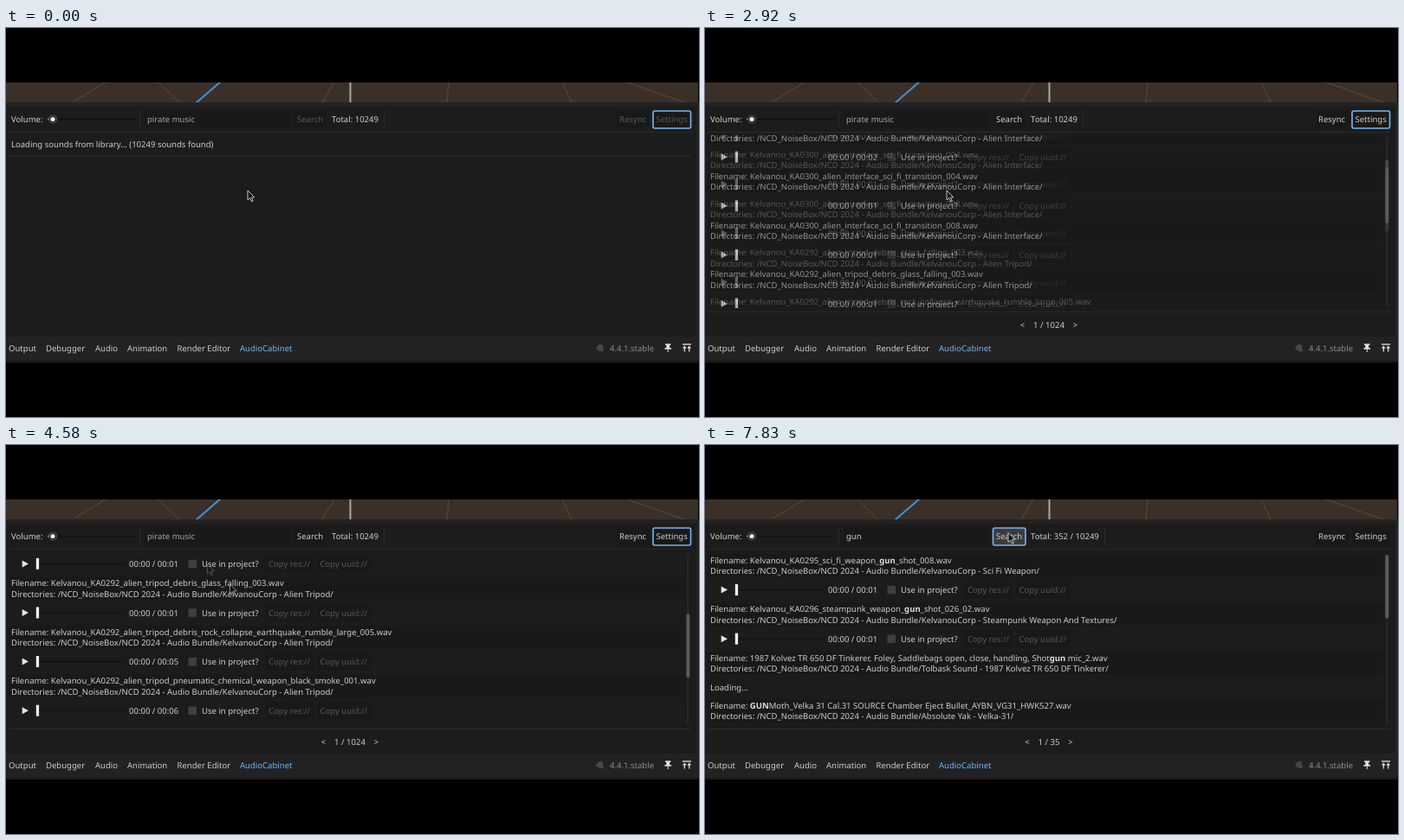
Write an HTML page with a canvas that moves like this. It is 800 px wide and 450 px high and loops after 8 s.

```html
<!DOCTYPE html>
<html lang="en">
<head>
<meta charset="utf-8">
<title>Sound browser</title>
<style>
html, body { margin: 0; width: 100%; height: 100%; overflow: hidden; background: #000; }
canvas { display: block; }
</style>
</head>
<body>
<canvas id="stage" width="800" height="450"></canvas>
<script>
const FACE = '9.54px "Noto Sans", "Open Sans", sans-serif';
const TEXT = '#cdcdcd', DIM = '#585758', BRIGHT = '#e4e4e4', BLUE = '#6fb4f0';
const BASE = '#232223', PANEL = '#1d1c1d', DARK = '#1a191a', LINE = '#2b2a2b';
const PITCH = 56.6, LIST_TOP = 124, LIST_END = 324;

const row = (name, dir, time) => ({ name: name + '.wav', dir, time });
const pack = (code, name, dir, time) =>
  row(`Kelvanou_KA${code}_${name}`, 'KelvanouCorp - ' + dir, time);
const face = (name, time) => pack('0300', 'alien_interface_sci_fi_' + name, 'Alien Interface', time);
const tripod = (name, time) => pack('0292', 'alien_tripod_' + name, 'Alien Tripod', time);

const library = [
  face('texture_003', 3), face('texture_045', 2),
  face('transition_004', 1), face('transition_008', 1),
  tripod('debris_glass_falling_003', 1),
  tripod('debris_rock_collapse_earthquake_rumble_large_005', 5),
  tripod('pneumatic_chemical_weapon_black_smoke_001', 6),
  tripod('texture_organic_liquid_005', 4)
];
const matches = [
  pack('0295', 'sci_fi_weapon_gun_shot_008', 'Sci Fi Weapon', 1),
  pack('0296', 'steampunk_weapon_gun_shot_026_02', 'Steampunk Weapon And Textures', 1),
  row('1987 Kolvez TR 650 DF Tinkerer, Foley, Saddlebags open, close, handling, Shotgun mic_2',
      'Tolbask Sound - 1987 Kolvez TR 650 DF Tinkerer'),
  row('GUNMoth_Velka 31 Cal.31 SOURCE Chamber Eject Bullet_AYBN_VG31_HWK527',
      'Absolute Yak - Velka-31')
];

// The recording has four poses a second; each entry changes the pose from that beat on.
const changes = {
  0: { rows: null, scroll: 0, mouse: [279, 188], focus: 'settings', query: 'pirate music',
       total: '10249', page: '1 / 1024' },
  2: { rows: library },
  10: { scroll: 100 }, 12: { scroll: 75 }, 13: { scroll: 125 }, 14: { scroll: 200 },
  17: { scroll: 225 },
  18: { scroll: 200, mouse: [258.5, 161] },
  19: { mouse: [232.5, 138] },
  20: { mouse: [199.5, 101], beam: true, focus: 'query', caret: 218 },
  22: { query: 'g', caret: 170 },
  26: { query: 'gun', caret: 181 },
  28: { mouse: [310, 103], beam: false },
  29: { mouse: [350, 101.5], focus: 'search', caret: 0 },
  30: { rows: matches, scroll: 0, mark: true, total: '352 / 10249', page: '1 / 35' }
};
const poses = [];
for (let i = 0; i <= 32; i++) poses.push({ ...poses[i - 1], ...changes[i] });

function makeContext(canvas) {
  const c = canvas.getContext('2d');
  c.font = FACE;
  c.textRendering = 'geometricPrecision';
  return c;
}
const screen = makeContext(document.getElementById('stage'));
const layer = document.createElement('canvas');
layer.width = 800;
layer.height = 450;
const g = makeContext(layer);

function box(x, y, w, h, color) {
  g.fillStyle = color;
  g.fillRect(x, y, w, h);
}
// y is the middle of the capitals
function text(s, x, y, color = TEXT) {
  g.fillStyle = color;
  g.fillText(s, x, y + 3.5);
  return x + g.measureText(s).width;
}
function poly(points, fill, stroke, width = 1) {
  g.beginPath();
  points.forEach(([x, y]) => g.lineTo(x, y));
  if (fill) { g.closePath(); g.fillStyle = fill; g.fill(); }
  if (stroke) { g.strokeStyle = stroke; g.lineWidth = width; g.stroke(); }
}
function disc(x, y, r, color) {
  g.beginPath();
  g.arc(x, y, r, 0, 7);
  g.fillStyle = color;
  g.fill();
}
function control(x, w, focused, fill = DARK) {
  g.beginPath();
  g.roundRect(x, 96, w, 20, 2);
  g.fillStyle = fill;
  g.fill();
  if (focused) {
    g.strokeStyle = '#70b8f6';
    g.lineWidth = 1.6;
    g.stroke();
  }
}

function viewport() {
  g.save();
  g.beginPath();
  g.rect(0, 63, 799, 23);
  g.clip();
  box(0, 63, 799, 23, '#3b3027');
  [[78, 85, 115, 63], [176, 63, 200, 86], [365, 86, 379, 63], [509, 86, 511, 63],
   [642, 63, 653, 86], [717, 63, 783, 86]]
    .forEach(([a, b, c, d]) => poly([[a, b], [c, d]], null, '#5d5247', 0.8));
  poly([[219, 87], [249, 61]], null, '#3f93dc', 2);
  poly([[397.5, 63], [397.5, 86]], null, '#a5aca2', 2);
  g.restore();
}

function toolbar(p) {
  const active = p.rows ? TEXT : DIM;
  text('Volume:', 6, 105.5);
  box(48, 104.7, 103, 1.6, '#121112');
  box(48, 104.7, 4, 1.6, '#8a8a8a');
  disc(54, 105.5, 4.8, '#6e6d6e');
  disc(54, 105.5, 3.9, DARK);
  disc(54, 105.5, 2.6, '#f2f2f2');
  box(154, 96, 1, 20, LINE);
  control(159.5, 169, p.focus === 'query');
  text(p.query, 163, 105.5, p.query.length > 3 ? '#a4a4a4' : TEXT);
  if (p.caret) box(p.caret - 0.8, 100, 0.9, 11, TEXT);
  const pressed = p.focus === 'search';
  control(332.5, 37.5, pressed, pressed ? '#3d3c3d' : DARK);
  text('Search', 336, 105.5, active);
  const end = text('Total: ' + p.total, 376, 105.5);
  box(Math.round(end + 6.5), 96, 1, 20, LINE);
  control(705, 38);
  text('Resync', 708, 105.5, active);
  control(747, 43.5, p.focus === 'settings');
  text('Settings', 750.5, 105.5, active);
  box(3, 120, 788, 1, LINE);
}

function title(name, y, mark) {
  let x = text('Filename: ', 6, y);
  for (const part of mark ? name.split(/(gun)/i) : [name]) {
    const bold = mark && /^gun$/i.test(part);
    g.font = (bold ? 'bold ' : '') + FACE;
    x = text(part, x, y, bold ? '#dedede' : TEXT);
  }
  g.font = FACE;
}

function entry(item, y, mark) {
  box(3, y - 7, 780, 26, DARK);
  title(item.name, y, mark);
  text(`Directories: /NCD_NoiseBox/NCD 2024 - Audio Bundle/${item.dir}/`, 6, y + 12.4);
  const mid = y + 34.4;
  if (!item.time) {
    text('Loading...', 6, mid - 0.8);
    return PITCH - 1.5;
  }
  poly([[18.7, mid - 4], [26, mid], [18.7, mid + 4]], BRIGHT);
  box(38, mid - 0.8, 99, 1.6, '#141314');
  box(34.8, mid - 6.5, 3.3, 13, '#f2f2f2');
  text('00:00 / 00:0' + item.time, 142, mid);
  box(210.5, mid - 4.7, 9.5, 9.5, '#403f40');
  text('Use in project?', 226, mid);
  box(299.5, mid - 10, 55, 20, DARK);
  text('Copy res://', 303, mid, DIM);
  box(359, mid - 10, 62, 20, DARK);
  text('Copy uuid://', 362.5, mid, DIM);
  return PITCH;
}

function list(p) {
  g.save();
  g.beginPath();
  g.rect(0, LIST_TOP, 796, LIST_END - LIST_TOP);
  g.clip();
  let y = 133.2 - p.scroll;
  for (const item of p.rows) y += entry(item, y, p.mark);
  g.restore();

  box(786.2, 127, 2, 195, LINE);
  g.beginPath();
  g.roundRect(785.3, 127 + p.scroll * 0.342, 4, 73.5, 2);
  g.fillStyle = '#5c5b5c';
  g.fill();

  box(3, 328, 788, 1, LINE);
  const half = g.measureText(p.page).width / 2;
  text(p.page, 397 - half, 343.5);
  text('<', 394 - half - 12.3, 343.5);
  text('>', 394.5 + half + 12.3, 343.5);
}

function tabs() {
  box(0, 357, 800, 30, BASE);
  box(0, 384.5, 800, 2.5, '#1b1a1b');
  [['Output', 3], ['Debugger', 46], ['Audio', 103], ['Animation', 140], ['Render Editor', 197.5]]
    .forEach(([s, x]) => text(s, x, 370));
  text('AudioCabinet', 270, 370, BLUE);
  text('4.4.1.stable', 697, 370, '#8d8d8d');

  // bell, pin and expand arrows
  poly([[681, 371.5], [683, 367.5], [686, 365.5], [689, 367], [690, 374.5], [685, 373.5]], '#484748');
  box(761, 365.3, 6.4, 1.6, BRIGHT);
  box(762.3, 366.5, 3.8, 4, BRIGHT);
  box(760.4, 370, 7.6, 1.6, BRIGHT);
  box(763.7, 371, 1, 4, BRIGHT);
  box(781, 365.3, 10, 1.3, BRIGHT);
  for (const x of [783.3, 788.7]) {
    poly([[x - 2.4, 370.4], [x, 367.4], [x + 2.4, 370.4]], BRIGHT);
    box(x - 0.6, 369, 1.2, 5.5, BRIGHT);
  }
}

function pointer([x, y], beam) {
  g.save();
  g.translate(x, y);
  if (beam) {
    const shape = [[-3, -5], [3, -5], [0, -5], [0, 5], [-3, 5], [3, 5]];
    poly(shape, null, '#222222', 3);
    poly(shape, null, '#e0e0e0', 1.3);
  } else {
    poly([[0, 0], [0, 11], [2.6, 8.7], [4.6, 12.8], [6.3, 12], [4.4, 8], [7.8, 7.8], [0, 0]],
      '#111111', '#d8d8d8', 0.9);
  }
  g.restore();
}

function paint(p) {
  box(0, 0, 800, 450, '#000');
  box(0, 86, 800, 301, BASE);
  box(0, 91, 797, 266, PANEL);
  viewport();
  toolbar(p);
  if (p.rows) {
    list(p);
  } else {
    text('Loading sounds from library... (10249 sounds found)', 6, 134);
    box(3, 148, 788, 1, LINE);
  }
  tabs();
  pointer(p.mouse, p.beam);
}

let shown = -1;
function tick() {
  const step = Math.floor((performance.now() % 8000) * 0.012 + 0.1) % 96;
  if (step !== shown) {
    shown = step;
    const beat = Math.floor(step / 3);
    paint(poses[beat]);
    screen.drawImage(layer, 0, 0);
    if (step % 3) {
      paint(poses[beat + 1]);
      screen.globalAlpha = step % 3 / 3;
      screen.drawImage(layer, 0, 0);
      screen.globalAlpha = 1;
    }
  }
  requestAnimationFrame(tick);
}
tick();
</script>
</body>
</html>
```
